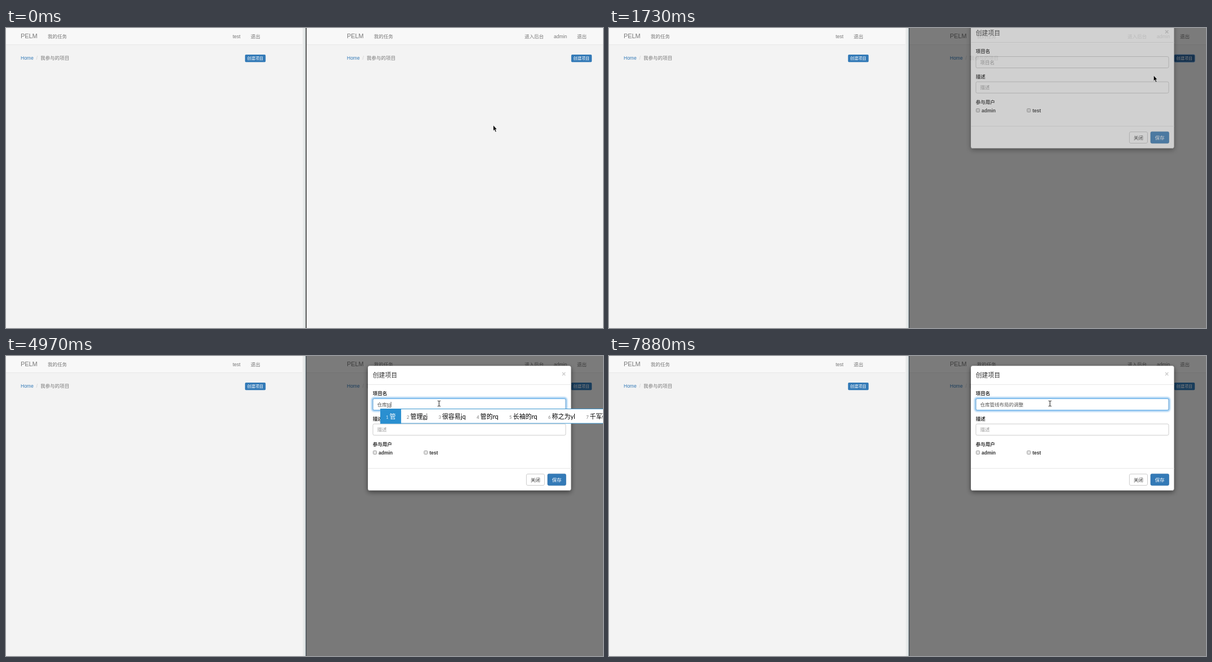
An HTML page for the animation above (8 s loop, 1056 by 530 pixels).

```html
<!DOCTYPE html>
<html lang="zh-CN">
<head>
<meta charset="utf-8">
<title>创建项目</title>
<style>
html, body { margin: 0; width: 100%; height: 100%; overflow: hidden; background: #f3f3f3; }
svg { display: block; width: 1056px; height: 530px; }
text { font: 8.5px "Liberation Sans", "Noto Sans CJK SC", "Noto Sans CJK", sans-serif; fill: #777; white-space: pre; }
.brand { font-size: 10.9px; }
.link { fill: #337ab7; }
.slash { fill: #ccc; }
.small { font-size: 7.2px; fill: #fff; font-weight: 500; }
.title { font-size: 10.8px; fill: #333; }
.bold { font-weight: 700; fill: #333; }
.dark { fill: #333; }
.white { fill: #fff; font-weight: 500; }
.hint { fill: #999; }
.value { fill: #555; }
.close { font-size: 12.6px; font-weight: 700; fill: #ccc; }
.num { font: 7.6px Lato, sans-serif; }
.word { font: 11px Lato, "Noto Sans CJK SC", "Noto Sans CJK", sans-serif; fill: #000; }
.num.on { fill: #d5eaf8; }
.word.on { fill: #fff; }
u, .comp { text-decoration: underline; }
</style>
</head>
<body>
<svg id="stage" viewBox="0 0 1056 530"></svg>
<script>
const LOOP = 8000;
const stage = document.getElementById('stage');

const text = (x, y, s, cls = '') => `<text x="${x}" y="${y}" class="${cls}">${s}</text>`;
const rect = (x, y, w, h, fill, more = '') =>
  `<rect x="${x}" y="${y}" width="${w}" height="${h}" fill="${fill}" ${more}/>`;
const field = y => rect(649, y, 341, 20, '#fff', 'stroke="#ccc" rx="2.4"');
const checkbox = x => rect(x + .5, 167.5, 6, 6, '#e4e4e4', 'stroke="#a0a0a0" rx="1"');

const page = (x, w, menu, id) => `
  ${rect(x, 0, w, 530, '#f3f3f3')}${rect(x, 0, w, 29, '#f8f8f8')}${rect(x, 29, w, 1, '#e7e7e7')}
  <g transform="translate(${x ? 577 : 0})">
    ${text(26, 18.4, 'PELM', 'brand')}${text(73.7, 17.7, '我的任务')}
    ${text(26, 56.2, 'Home', 'link')}${text(53.5, 56.2, '/', 'slash')}${text(61, 56.2, '我参与的项目')}
    ${rect(422.8, 47, 36.4, 13.2, '#337ab7', `rx="1.8" id="${id}"`)}${text(426.5, 56.3, '创建项目', 'small')}
  </g>
  ${menu.map(([mx, s]) => text(mx, 17.7, s)).join('')}`;

stage.innerHTML = `
  <defs>
    <linearGradient id="edge"><stop stop-color="#f3f3f3"/><stop offset="1" stop-color="#d6dcdc"/></linearGradient>
    <filter id="shadow" x="-10%" y="-10%" width="120%" height="125%">
      <feDropShadow dx="0" dy="3" stdDeviation="4.2" flood-opacity=".5"/></filter>
    <filter id="blur" x="-5%" y="-50%" width="110%" height="200%"><feGaussianBlur stdDeviation="1.8"/></filter>
  </defs>
  ${page(0, 531, [[401, 'test'], [432.8, '退出']], 'leftBtn')}
  ${rect(524, 0, 6, 530, 'url(#edge)')}
  ${page(531, 525, [[917.2, '进入后台'], [969, 'admin'], [1010, '退出']], 'createBtn')}
  ${rect(530, 0, 1.7, 530, '#444', 'id="divider"')}
  ${rect(531, 0, 525, 530, '#000', 'id="backdrop"')}
  <g id="modal">
    ${rect(640, 17.3, 359.5, 220.2, '#fff', 'rx="3.6" filter="url(#shadow)"')}
    ${rect(640, 17.3, 359.5, 220.2, 'none', 'rx="3.6" stroke="#000" stroke-opacity=".2" stroke-width=".6"')}
    ${text(648.8, 37.6, '创建项目', 'title')}${text(983, 35.7, '×', 'close')}
    ${rect(640, 50, 359.5, 1, '#e8e8e8')}${rect(640, 198, 359.5, 1, '#e8e8e8')}
    ${text(648.8, 69.4, '项目名', 'bold')}
    <g id="glow">${rect(648, 74.5, 343, 22, 'none', 'rx="3" stroke="#66afe9" stroke-width="2.4" filter="url(#blur)"')}</g>
    ${field(75.5)}
    <g id="focus">${rect(649, 75.5, 341, 20, 'none', 'stroke="#66afe9" rx="2.4"')}</g>
    ${text(656.5, 89.2, '', 'value').replace('<text', '<text id="value"')}
    ${rect(0, 81, .8, 9.6, '#333', 'id="caret"')}
    ${text(648.8, 114.3, '描述', 'bold')}${field(120)}${text(656.5, 133.3, '描述', 'hint')}
    ${text(648.8, 158.5, '参与用户', 'bold')}
    ${checkbox(649)}${text(659, 174.3, 'admin', 'bold')}${checkbox(739)}${text(749, 174.3, 'test', 'bold')}
    ${rect(920.5, 208.5, 32, 20, '#fff', 'stroke="#ccc" rx="2.4"')}${text(928, 221.7, '关闭', 'dark')}
    ${rect(958, 208.2, 32.5, 20.5, '#337ab7', 'rx="2.4" stroke="#2e6da4" stroke-width=".6"')}${text(965.7, 221.7, '保存', 'white')}
  </g>
  <g id="ime"></g>
  <path id="arrow" d="M0 0V9.4L2.1 7.5 3.6 11.6 5.3 10.9 3.7 7H6.3Z" stroke="#fff" stroke-width=".6" stroke-opacity=".7"/>
  <path id="beam" d="M-2.5-4.8Q0-4.8 0-3.6Q0-4.8 2.5-4.8M0-3.6V3.6M-2.5 4.8Q0 4.8 0 3.6Q0 4.8 2.5 4.8" fill="none" stroke="#111"/>`;

const el = id => document.getElementById(id);
const show = (id, on) => el(id).setAttribute('visibility', on ? 'visible' : 'hidden');

// Each track is a list of [start time, ...values]; a value holds until the next one.
const at = (track, t) => track.reduce((last, step) => step[0] <= t ? step : last);

const pointer = [
  [0, 'arrow', 862, 172], [680, 'arrow', 937, 147], [830, 'arrow', 990, 118],
  [950, 'arrow', 1034, 91], [1100, 'arrow', 1025, 76], [1220, 'arrow', 1014, 59],
  [1370, 'arrow', 1012.5, 52], [1610, 'arrow', 998, 64], [1730, 'arrow', 963.5, 84],
  [1880, 'arrow', 868, 108], [2000, 'beam', 801, 131], [2150, 'beam', 769, 87],
  [2300, 'beam', 766, 84], [7760, 'beam', 773, 84], [7880, 'beam', 780, 84]
];
const dim = [[0, 0], [1490, .055], [1610, .46], [1730, .5]];
const dialog = [[0, 0, -55], [1730, .65, -25], [1880, 1, -2.5], [2000, 1, 0]];
const focus = [[0, 0], [2300, .5], [2430, 1]];

// [time, committed text, typed code, caret, bar left, candidates]
const typing = [
  [0, '', '', 0],
  [2300, '', '', 1],
  [2830, 'w', '', 1],
  [3350, 'w', '', 0],
  [3500, '', '', 1],
  [3810, '', 'w', 1, 661, '人 你q 他b 但jg 他们bwu 从w 但是jjg'],
  [4120, '', 'wb', 1, 661, '仓 他们wu 作出m 假如vk 健儿qt 分子bb 公孙bi'],
  [4270, '', 'wb', 1, 661, '仓 仓促wk 估量jg 今后rg 个子bb 仓皇rg 公了bn'],
  [4420, '', 'wby', 1, 641, '仓库l 仓房n 仓储员wk 仓库门uy 公文包yq 分离器kk 他说过yu'],
  [4700, '仓库', '', 1],
  [4820, '仓库', 't', 1, 662, '和 我q 的r 很v 生活it 向tm 自己的nr 得到gc 行动fc'],
  [4970, '仓库', 'tp', 1, 662, '管 管理gj 很容易jq 管的rq 长袖的rq 称之为yl 千军破竹'],
  [5120, '仓库', 'tpx', 1, 662, '管线g 管弦y 管线图l 很密m 长空线g 管弦声f 笔案线g'],
  [5250, '仓库', 'tpxg', 1, 673, '管线 管线图t 管线路k 管线网m 管段w'],
  [5400, '仓库管线', '', 1],
  [5930, '仓库管线', 'd', 1, 642, '在 有e 大d 不过f 面m 成为yl 而且eg 原来的go 历史kq'],
  [6070, '仓库管线', 'dm', 1, 614, '布局nn 有同感g 春风m 万山mm 成见qb 布帆风顺 大同小异 百内w'],
  [6200, '仓库管线', 'dmn', 1, 691, '布局n 布展a 有内情g 大同书n 压岁n 面巾c 成内b'],
  [6350, '仓库管线布局', '', 1],
  [6470, '仓库管线布局的', '', 1],
  [6870, '仓库管线布局的', 'y', 1, 610, '这 主要sv 为o 说u 方法if 就是jg 文化wx 应该yy 广大的dr'],
  [6990, '仓库管线布局的', 'ym', 1, 610, '调 调整gk 高山mm 训典m 这同样su 设岗m 调用et 调动起来'],
  [7110, '仓库管线布局的调整', '', 1],
  [7760, '仓库管线布局的调整', '', 0]
];

function drawBar(left, list, top) {
  const bar = el('ime');
  bar.innerHTML = '';
  if (!list) return;
  const base = top + 17.8;
  bar.innerHTML = list.split(' ').map((s, i) =>
    text(0, base, i + 1, i ? 'num' : 'num on') + text(0, base, s, i ? 'word' : 'word on')).join('');
  let x = left + 10, firstEnd = 0;
  const labels = bar.querySelectorAll('text');
  for (let i = 0; i < labels.length; i += 2) {
    labels[i].setAttribute('x', x);
    labels[i + 1].setAttribute('x', x + 6.4);
    const end = x + 6.4 + labels[i + 1].getComputedTextLength();
    firstEnd = firstEnd || end + 9.5;
    x = end + 19.4;
  }
  const end = x - 9.5, cx = end + 13.5, cy = top + 13.3;
  bar.insertAdjacentHTML('afterbegin',
    rect(left + .5, top + .5, end + 26 - left, 25.5, '#fff', 'stroke="#3a95d0"') +
    rect(left, top, firstEnd - left, 26.5, '#2a8fd0'));
  bar.insertAdjacentHTML('beforeend', rect(end - .5, top, 1, 26, '#3a95d0') +
    `<g fill="none" stroke="#222"><circle cx="${cx}" cy="${cy}" r="4.9"/>
    <path d="M${cx - 2.8} ${cy + 1}q2.8 3.6 5.6 0M${cx - 2.4} ${cy - 1.5}h1.3M${cx + 1.1} ${cy - 1.5}h1.3"/></g>`);
}

let current;
function drawTyping(step) {
  if (step === current) return;
  current = step;
  const [time, done, code, caret, left, list] = step;
  const value = el('value'), empty = !done && !code;
  value.setAttribute('class', empty ? 'hint' : 'value');
  value.innerHTML = empty ? '项目名' : `${done}<tspan class="comp">${code}</tspan>`;
  el('caret').setAttribute('x', 656.5 + (empty ? 0 : value.getComputedTextLength()));
  el('caret').setAttribute('fill-opacity', caret);
  drawBar(left, list, time < 4700 ? 92 : 93);
}

function render(t) {
  const [, kind, x, y] = at(pointer, t);
  for (const id of ['arrow', 'beam']) show(id, id === kind);
  el(kind).setAttribute('transform', `translate(${x} ${y})`);

  el('divider').setAttribute('fill', t < 530 ? '#444' : '#4c5962');
  el('divider').setAttribute('width', t < 530 ? 1.7 : 1.3);
  el('backdrop').setAttribute('opacity', at(dim, t)[1]);

  const pressed = t >= 1370 && t < 2300, btn = el('createBtn');
  btn.setAttribute('fill', pressed ? '#28619a' : '#337ab7');
  btn.setAttribute('stroke', pressed ? '#7fb0e4' : 'none');

  const [, alpha, dy] = at(dialog, t);
  el('modal').setAttribute('opacity', alpha);
  el('modal').setAttribute('transform', `translate(0 ${dy})`);
  for (const id of ['glow', 'focus']) el(id).setAttribute('opacity', at(focus, t)[1]);
  drawTyping(at(typing, t));
}

const start = performance.now();
function tick() {
  render((performance.now() - start) % LOOP);
  requestAnimationFrame(tick);
}
tick();
</script>
</body>
</html>
```
